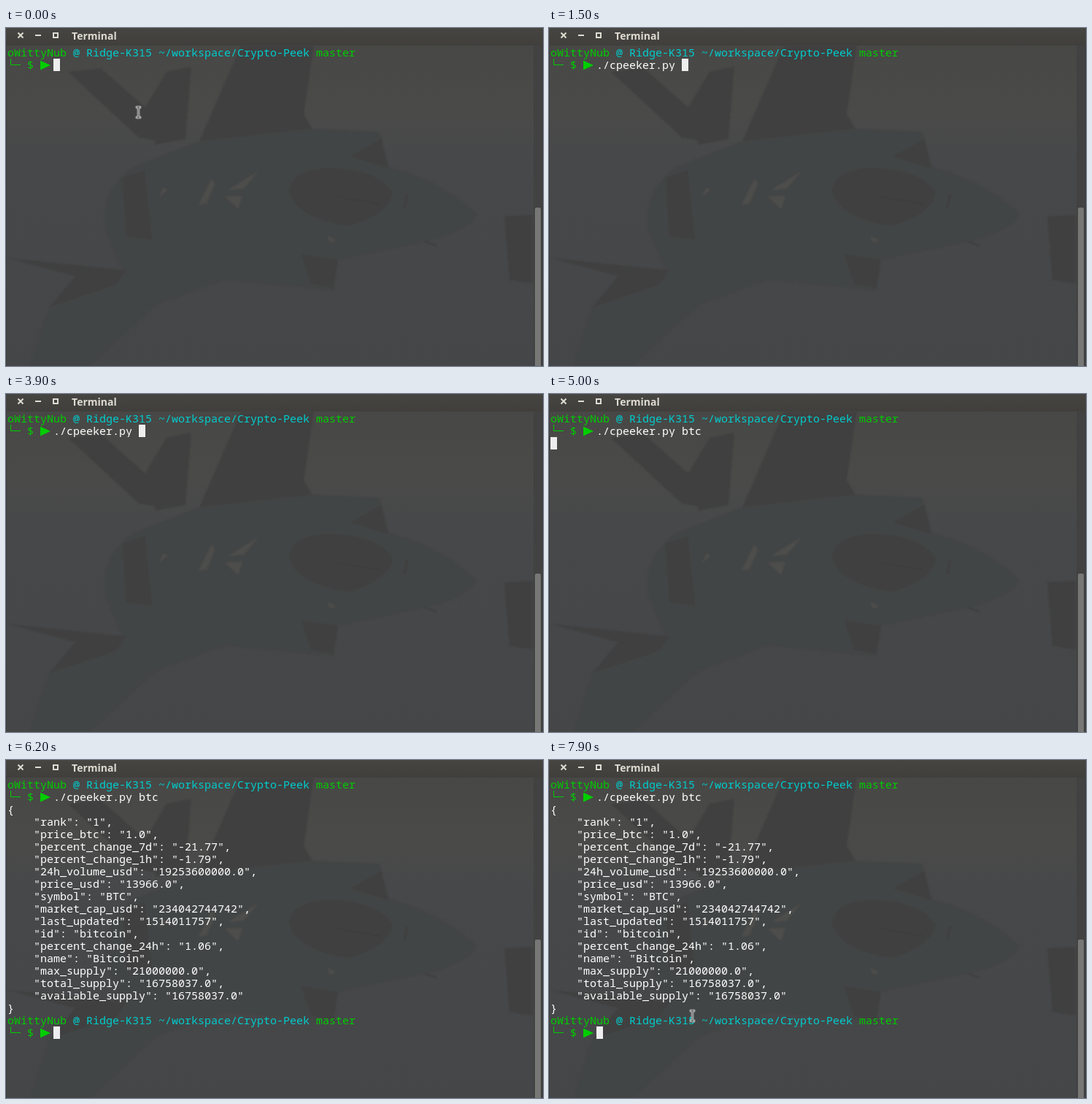
Recreate the animation shown at these times as an HTML page. Size 736 px wide and 463 px high, loop 8000 ms.

```html
<!DOCTYPE html>
<html lang="en">
<head>
<meta charset="utf-8">
<title>Terminal</title>
<style>
  html, body { margin: 0; width: 100%; height: 100%; overflow: hidden; background: #464748; }
  #stage { position: relative; width: 736px; height: 463px; overflow: hidden; }
  #stage > * { position: absolute; }
  svg { left: 0; top: 0; }
  pre {
    left: 2px; top: 25px; margin: 0; color: #fff;
    font: 15px/17px "Noto Sans Mono", "DejaVu Sans Mono", monospace;
    font-variant-ligatures: none;
  }
  .user { color: #00cd00; }
  .path { color: #00cdcd; }
  .title { font: bold 14px "Noto Sans", "Open Sans", sans-serif; fill: #dfdbd2; }

  /* One 8 s clock; all changes are hard cuts. */
  .typed, .cursor, .output, .pointer { animation: 8s step-end infinite; }
  .typed { left: 65px; top: 42px; width: 0; overflow: hidden; animation-name: type; }
  .cursor {
    left: 65px; top: 42px; width: 9px; height: 17px; background: #eeeeee;
    animation-name: move, blink;
  }
  .output { animation-name: print; }
  .pointer { animation-name: point; }

  @keyframes type {
    0% { width: 0; }
    5% { width: 9px; }
    10% { width: 18px; }
    13.75% { width: 27px; }
    18.75% { width: 117px; }
    50% { width: 126px; }
    51.25% { width: 135px; }
    55%, 100% { width: 144px; }
  }
  @keyframes move {
    0% { transform: none; }
    5% { transform: translate(9px, 0); }
    10% { transform: translate(18px, 0); }
    13.75% { transform: translate(27px, 0); }
    18.75% { transform: translate(117px, 0); }
    50% { transform: translate(126px, 0); }
    51.25% { transform: translate(135px, 0); }
    55% { transform: translate(144px, 0); }
    62.5% { transform: translate(-63px, 17px); }
    66.25%, 100% { transform: translate(0, 323px); }
  }
  @keyframes blink {
    0%, 5%, 33.75%, 48.75%, 62.5%, 77.5%, 92.5%, 100% { opacity: 1; }
    2.5%, 26.25%, 41.25%, 61.25%, 70%, 85% { opacity: 0; }
  }
  @keyframes print {
    0% { opacity: 0; }
    66.25%, 100% { opacity: 1; }
  }
  @keyframes point {
    0% { transform: translate(181.5px, 115.5px); opacity: 1; }
    5% { transform: translate(181.5px, 115.5px); opacity: 0; }
    97.5% { transform: translate(63.5px, 195.5px); opacity: 1; }
    98.75%, 100% { transform: translate(196.5px, 350.5px); opacity: 1; }
  }
</style>
</head>
<body>
<div id="stage">
  <svg width="736" height="463">
    <defs>
      <linearGradient id="sky" x2="0" y2="1">
        <stop offset="0" stop-color="#474745"/>
        <stop offset=".25" stop-color="#4a4a49"/>
        <stop offset=".4" stop-color="#47484a"/>
        <stop offset="1" stop-color="#454648"/>
      </linearGradient>
      <linearGradient id="bar" x2="0" y2="1">
        <stop offset="0" stop-color="#464541"/>
        <stop offset="1" stop-color="#403f3c"/>
      </linearGradient>
      <filter id="soft"><feGaussianBlur stdDeviation="1"/></filter>
      <g id="prompt">
        <path d="M6.5 0V8.5H20" fill="none" stroke="#00cd00"/>
        <path d="M47 2.5L61 9L47 15.5Z" fill="#00cd00"/>
      </g>
    </defs>
    <rect width="736" height="463" fill="url(#sky)"/>

    <!-- Faint aircraft wallpaper -->
    <g filter="url(#soft)">
      <path fill="#434444" d="M135 250Q140 215 175 190L265 155L420 138L512 142L525 190Q600 210 645 255Q640 275 580 292L455 318L450 360L300 345L205 380L115 463H32L60 380L160 335L135 275Z"/>
      <path fill="#404141" d="M85 60L130 55L190 108L212 155L182 150ZM190 110L220 60L254 53L246 152L205 160ZM265 155L322 24H422L408 118L420 138Z"/>
      <path fill="#3f4040" d="M388 222Q395 190 450 192Q510 195 530 225Q525 255 470 271Q395 260 388 222ZM472 176L514 152L524 192ZM405 310L455 318L448 356L418 350ZM2 315L165 332L150 352L60 382L95 340ZM683 258L722 256V350L690 345Z"/>
      <path fill="#404141" d="M160 205L190 195L200 290L165 285Z"/>
      <path fill="#4d4d4c" d="M264 242L282 206L286 214L275 240ZM304 222L346 196L326 220ZM300 231L324 230L318 248ZM209 232L216 218L221 222ZM440 284L452 291L444 294Z"/>
      <path fill="none" stroke="#3d3e3e" stroke-width="2" d="M455 231L512 241M550 228L546 246M575 293L590 298"/>
    </g>

    <rect width="736" height="24" fill="url(#bar)"/>
    <g fill="none" stroke="#dfdbd2" stroke-width="2">
      <path d="M16.5 6.5L23.5 13.5M23.5 6.5L16.5 13.5M40 10H48"/>
      <rect x="65" y="7" width="6" height="6"/>
    </g>
    <text class="title" x="90" y="16">Terminal</text>

    <rect x="723" y="24" width="13" height="439" fill="#414241"/>
    <rect x="725" y="246" width="8" height="225" rx="2" fill="#777776"/>
    <path d="M.5 24V463M735.5 24V463" stroke="#3c3c3b"/>

    <use href="#prompt" y="42"/>
    <g class="output"><use href="#prompt" y="365"/></g>
  </svg>

  <pre><span class="user">oWittyNub</span> <span class="path">@ Ridge-K315 ~/workspace/Crypto-Peek</span> <span class="user">master
   $</span></pre>
  <pre class="typed">./cpeeker.py btc</pre>
  <pre class="output">

{
    "rank": "1",
    "price_btc": "1.0",
    "percent_change_7d": "-21.77",
    "percent_change_1h": "-1.79",
    "24h_volume_usd": "19253600000.0",
    "price_usd": "13966.0",
    "symbol": "BTC",
    "market_cap_usd": "234042744742",
    "last_updated": "1514011757",
    "id": "bitcoin",
    "percent_change_24h": "1.06",
    "name": "Bitcoin",
    "max_supply": "21000000.0",
    "total_supply": "16758037.0",
    "available_supply": "16758037.0"
}
<span class="user">oWittyNub</span> <span class="path">@ Ridge-K315 ~/workspace/Crypto-Peek</span> <span class="user">master
   $</span></pre>
  <div class="cursor"></div>

  <svg width="736" height="463">
    <g class="pointer" fill="none">
      <path d="M-3.5 -7H3.5M-3.5 7H3.5M0 -7V7" stroke="#f2f2f2" stroke-width="3"/>
      <path d="M-2.5 -7H2.5M-2.5 7H2.5M0 -7V7" stroke="#222"/>
    </g>
  </svg>
</div>
<script>
  // The parser drops the first newline of a pre, so restore the two blank rows.
  const output = document.querySelector("pre.output");
  output.prepend("\n");
</script>
</body>
</html>
```
